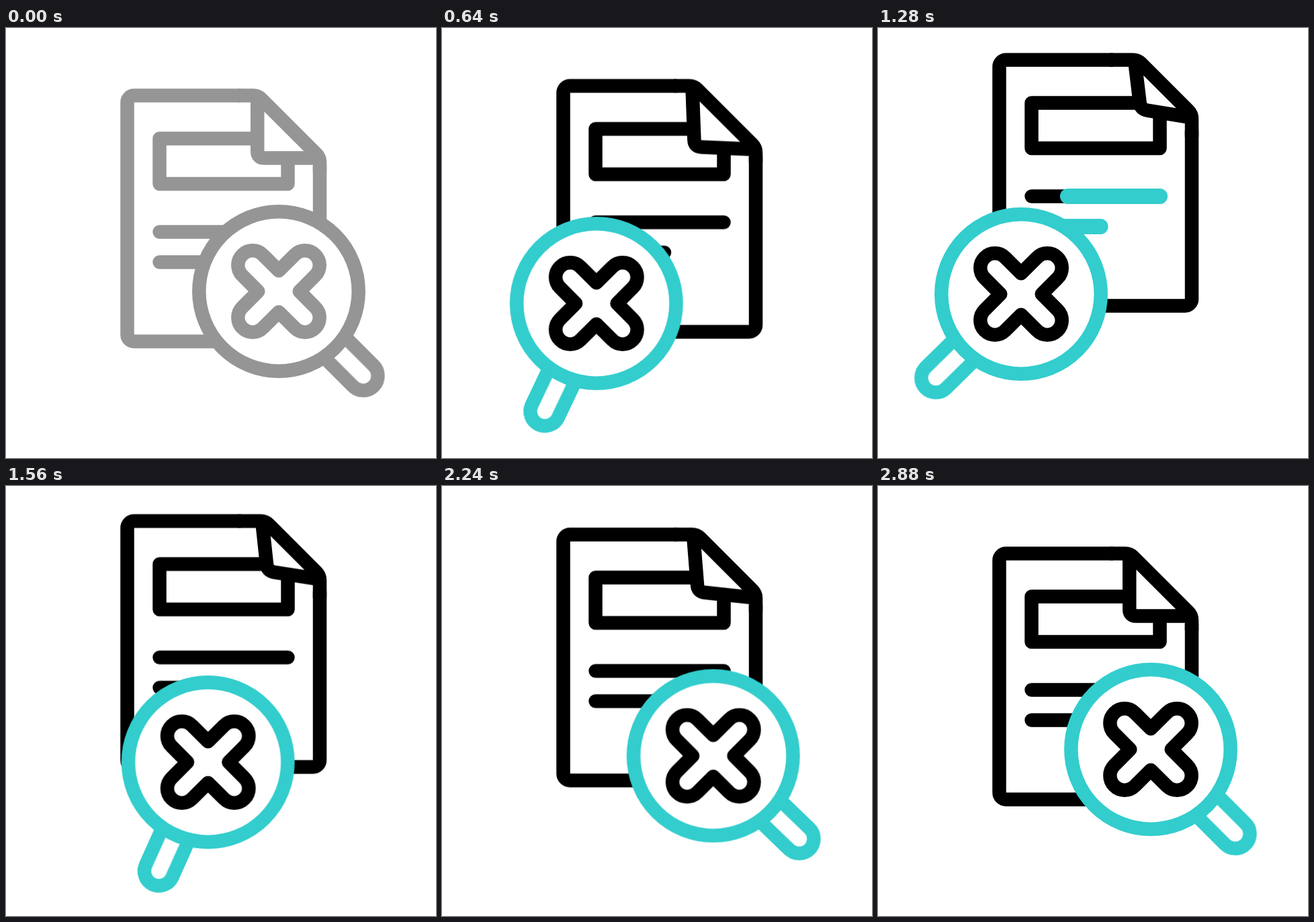
Recreate the animation shown at these times as an HTML page without scripts. Size 640 by 640 pixels, loop 3.2 s.

```html
<!DOCTYPE html>
<html lang="en">
<head>
<meta charset="utf-8">
<title>Document search</title>
<style>
  html, body { margin: 0; width: 100%; height: 100%; overflow: hidden; background: #fff; }
  svg { display: block; width: 100%; height: 100%; }
  svg * { animation-duration: 3200ms; animation-iteration-count: infinite; }

  path, rect, circle { fill: none; stroke-width: 20.5; stroke-linejoin: round; }
  .cap { stroke-linecap: round; }
  .white { fill: #fff; }
  .ink { animation-name: ink; animation-timing-function: step-end; }
  .tint { animation-name: tint; animation-timing-function: step-end; }
  .doc { animation-name: bob; }
  .fold { animation-name: fold; animation-timing-function: ease-in-out; }
  .mark { stroke: #33cdcd; stroke-width: 23; stroke-dasharray: 1 2; animation-name: mark; animation-timing-function: linear; }
  .lens-x { animation-name: lens-x; }
  .lens-y { animation-name: lens-y; animation-timing-function: ease-in-out; }
  .handle { animation-name: swing; }

  @keyframes ink { 0% { stroke: #959595 } 6.875%, 100% { stroke: #000 } }
  @keyframes tint { 0% { stroke: #959595 } 6.875%, 100% { stroke: #33cdcd } }

  @keyframes bob {
    0%, 6.875% { transform: translateY(0); animation-timing-function: linear }
    9.375% { transform: translateY(17px); animation-timing-function: ease-out }
    10.4% { transform: translateY(19px); animation-timing-function: cubic-bezier(.35, 0, .67, .65) }
    20% { transform: translateY(-14.2px); animation-timing-function: linear }
    23.125% { transform: translateY(-26px); animation-timing-function: cubic-bezier(.3, .5, .67, .85) }
    40% { transform: translateY(-53px); animation-timing-function: ease-out }
    43.125% { transform: translateY(-56px); animation-timing-function: cubic-bezier(.5, 0, .7, .75) }
    55.625% { transform: translateY(-24.7px); animation-timing-function: ease-out }
    61.25% { transform: translateY(-15px); animation-timing-function: ease-in-out }
    70% { transform: translateY(-28.3px); animation-timing-function: cubic-bezier(.4, .1, .7, .6) }
    74.375% { transform: translateY(-19px); animation-timing-function: cubic-bezier(.25, .5, .6, 1) }
    90%, 100% { transform: translateY(0) }
  }

  @keyframes fold {
    0%, 6.875%, 90%, 100% { d: path("M345 100.5H367.9q7 0 12 5L462 187.6q5 5 5 12V215M467 193.6L384.2 193.6Q374.2 193.6 374.2 183.6L374.2 100.5") }
    9.375% { d: path("M345 100.5H367.9q7 0 12 5L462 187.6q5 5 5 12V215M467 194.5L382.7 194.5Q372.7 194.5 372.7 184.5L372.7 100.5") }
    20% { d: path("M345 100.5H367.9q7 0 12 5L462 187.6q5 5 5 12V215M467 195L385.7 191.4Q375.7 191 375.4 181L372.4 100.5") }
    40% { d: path("M345 100.5H379.5q7 0 12 5L462 176q5 5 5 12V215M467 186.3L400.7 175.6Q390.8 174 389.6 164.1L382 100.5") }
    55.625% { d: path("M345 100.5H378.7q7 0 12 5L462 176.8q5 5 5 12V215M467 187.5L397.9 177.1Q388 175.6 387 165.7L380.5 100.5") }
    70% { d: path("M345 100.5H372.3q7 0 12 5L462 183.2q5 5 5 12V215M467 194.9L390.7 186.8Q380.8 185.7 380 175.7L374 100.5") }
  }

  @keyframes mark {
    0%, 23.75% { stroke-dashoffset: 1.2 }
    35%, 37.5% { stroke-dashoffset: 0 }
    40% { stroke-dashoffset: -.277 }
    45.3%, 100% { stroke-dashoffset: -1.2 }
  }

  @keyframes lens-x {
    0%, 9.7% { transform: translateX(406px); animation-timing-function: cubic-bezier(.4, 0, .6, .81) }
    20% { transform: translateX(230px); animation-timing-function: cubic-bezier(.33, .41, .67, .83) }
    23.125% { transform: translateX(210px); animation-timing-function: cubic-bezier(.2, .6, .5, 1) }
    29.4% { transform: translateX(204px); animation-timing-function: ease-in-out }
    40% { transform: translateX(213px); animation-timing-function: cubic-bezier(.5, 0, .65, .8) }
    55.625% { transform: translateX(415px); animation-timing-function: ease-out }
    58.75% { transform: translateX(432px); animation-timing-function: ease-in-out }
    70% { transform: translateX(403.7px); animation-timing-function: ease-in-out }
    90%, 100% { transform: translateX(406px) }
  }

  @keyframes lens-y {
    0%, 9.7% { transform: translateY(392px) }
    16.5% { transform: translateY(421px) }
    20% { transform: translateY(410px); animation-timing-function: ease-out }
    29.4% { transform: translateY(398px) }
    40% { transform: translateY(396px) }
    50.6% { transform: translateY(412px) }
    55.625% { transform: translateY(393px); animation-timing-function: ease-out }
    58.1% { transform: translateY(390px); animation-timing-function: cubic-bezier(.45, 0, .7, .7) }
    70% { transform: translateY(401.5px); animation-timing-function: ease-out }
    75.6% { transform: translateY(409px) }
    90%, 100% { transform: translateY(392px) }
  }

  @keyframes swing {
    0%, 9.7% { transform: rotate(45deg); animation-timing-function: cubic-bezier(.4, 0, .6, .8) }
    20% { transform: rotate(115.4deg); animation-timing-function: linear }
    23.125% { transform: rotate(126deg); animation-timing-function: ease-out }
    29.4% { transform: rotate(140deg); animation-timing-function: ease-in-out }
    40% { transform: rotate(135.5deg); animation-timing-function: cubic-bezier(.6, 0, .7, .55) }
    55.625% { transform: rotate(55.3deg); animation-timing-function: ease-out }
    58.75% { transform: rotate(38.6deg); animation-timing-function: ease-in-out }
    70% { transform: rotate(44deg); animation-timing-function: ease-in-out }
    90%, 100% { transform: rotate(45deg) }
  }
</style>
</head>
<body>
<svg viewBox="0 0 640 640">
  <g class="doc">
    <g class="ink">
      <rect x="228.5" y="164.5" width="191" height="67.5"/>
      <path class="cap" d="M228.5 303.5H419.5M228.5 348.5H331"/>
      <path d="M467 205V456.5a10 10 0 0 1-10 10H190.5a10 10 0 0 1-10-10V110.5a10 10 0 0 1 10-10H350"/>
      <path class="fold white"/>
    </g>
    <path class="mark cap" pathLength="1" d="M228.5 303.5H419.5"/>
    <path class="mark cap" pathLength="1" d="M228.5 348.5H331"/>
  </g>
  <g class="lens-x">
    <g class="lens-y">
      <g class="tint">
        <path class="handle white" d="M112-21.7H178A21.7 21.7 0 0 1 178 21.7H112"/>
        <circle class="white" r="118.7"/>
      </g>
      <g class="ink">
        <path d="M0-30.7L23.65-54.35A21.7 21.7 0 0 1 54.35-23.65L30.7 0L54.35 23.65A21.7 21.7 0 0 1 23.65 54.35L0 30.7L-23.65 54.35A21.7 21.7 0 0 1-54.35 23.65L-30.7 0L-54.35-23.65A21.7 21.7 0 0 1-23.65-54.35Z"/>
      </g>
    </g>
  </g>
</svg>
</body>
</html>
```
